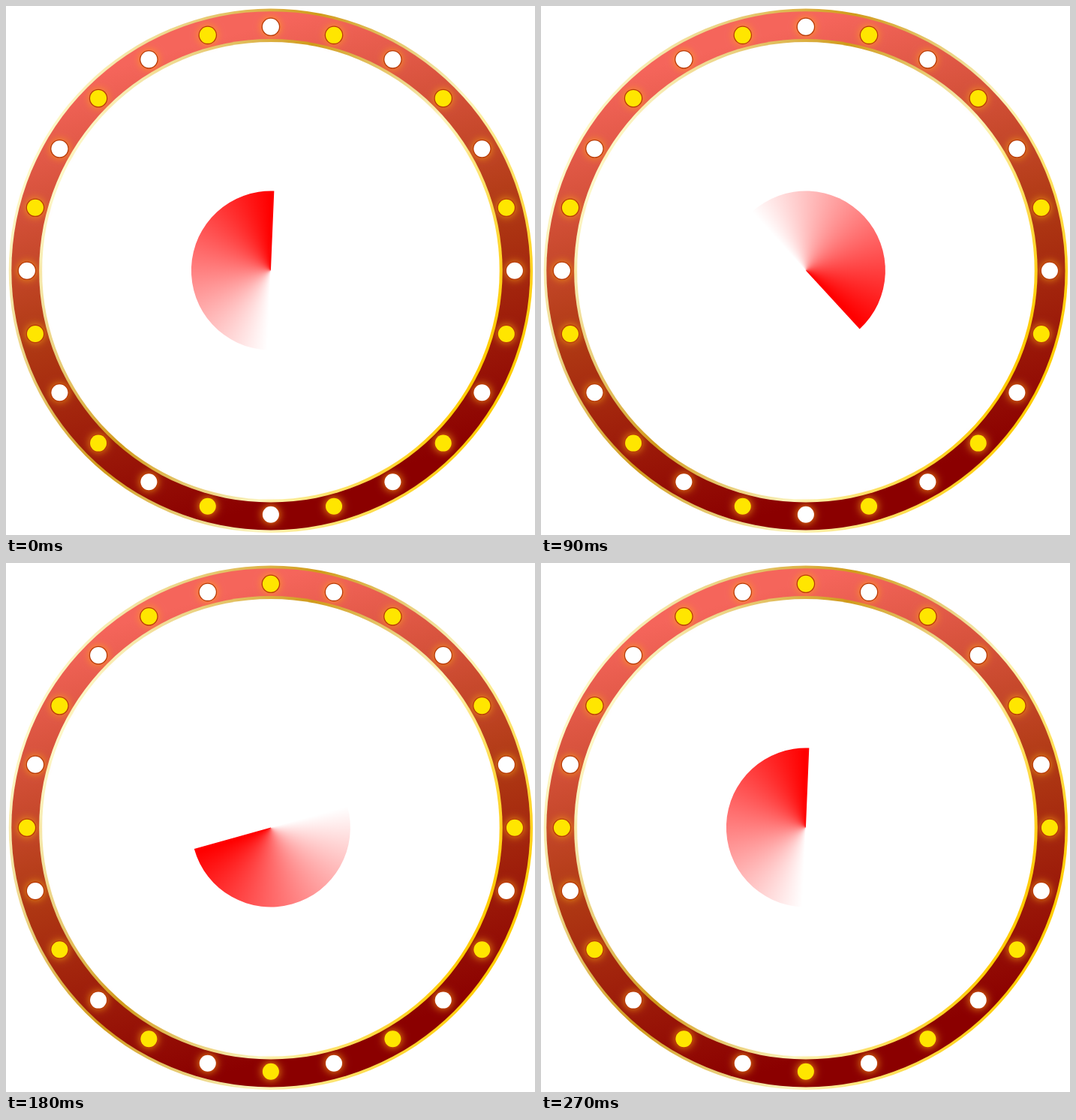
Write an HTML page with a canvas that moves like this. It is 705 by 705 pixels and loops after 300 ms.

```html
<!DOCTYPE html>
<html>
<head>
<meta charset="utf-8">
<style>
  html, body { margin: 0; overflow: hidden; background: #fff; }
  canvas { display: block; }
</style>
</head>
<body>
<canvas id="stage" width="705" height="705"></canvas>
<script>
const ctx = document.getElementById('stage').getContext('2d');
const CX = 352.9, CY = 352.8, TAU = Math.PI * 2, DEG = Math.PI / 180;
const STEP = 30, STEPS = 10;

// Linear gradient through the centre along (dx, dy), with stops at [offset, colour]
function gradient(dx, dy, stops) {
  const g = ctx.createLinearGradient(CX - dx, CY - dy, CX + dx, CY + dy);
  stops.forEach(([offset, colour]) => g.addColorStop(offset, colour));
  return g;
}

const gold = r => gradient(0.9 * r, 0.43 * r, [
  [0, '#fdf8c8'], [0.37, '#d09a1a'], [0.69, '#fbf5c0'], [1, '#ffcc00']
]);
const outerGold = gold(349);
const innerGold = gold(309);
const red = gradient(87, 305, [[0, '#f5655b'], [0.5, '#b03a14'], [0.97, '#8b0000']]);

function disc(x, y, r, fill) {
  ctx.fillStyle = fill;
  ctx.beginPath();
  ctx.arc(x, y, r, 0, TAU);
  ctx.fill();
}

function drawBulbs(swapped) {
  for (let i = 0; i < 24; i++) {
    const a = i * 15 * DEG;
    const x = CX + 325 * Math.sin(a), y = CY - 325 * Math.cos(a);
    ctx.shadowColor = 'rgba(255, 170, 20, 0.75)';
    ctx.shadowBlur = 11;
    disc(x, y, 12.3, '#b83a08');
    ctx.shadowBlur = 0;
    ctx.shadowColor = 'transparent';
    disc(x, y, 11, i % 2 === swapped ? '#fff' : '#ffe600');
  }
}

function drawSweep(degrees) {
  const end = (degrees - 90) * DEG, start = end - Math.PI;
  const g = ctx.createConicGradient(start, CX, CY - 0.3);
  g.addColorStop(0, 'rgba(255, 0, 0, 0)');
  g.addColorStop(0.49, 'rgb(255, 0, 0)');
  g.addColorStop(0.75, 'rgb(255, 0, 0)');
  g.addColorStop(0.751, 'rgba(255, 0, 0, 0)');
  ctx.fillStyle = g;
  ctx.beginPath();
  ctx.moveTo(CX, CY - 0.3);
  ctx.arc(CX, CY - 0.3, 106, start, end);
  ctx.fill();
}

function draw(ms) {
  const step = Math.floor(ms / STEP) % STEPS;
  ctx.clearRect(0, 0, 705, 705);
  disc(CX, CY, 349.2, outerGold);
  disc(CX, CY, 345.6, red);
  disc(CX, CY, 308.8, innerGold);
  disc(CX, CY, 304.8, '#fff');
  drawBulbs(step < 5 ? 0 : 1);
  // Half a turn in four steps, the other half in five
  drawSweep(2.4 + (step < 4 ? step * 45 : 180 + (step - 4) * 36));
}

let origin;
function tick(now) {
  origin ??= now;
  draw(now - origin);
  requestAnimationFrame(tick);
}
draw(0);
requestAnimationFrame(tick);
</script>
</body>
</html>
```
